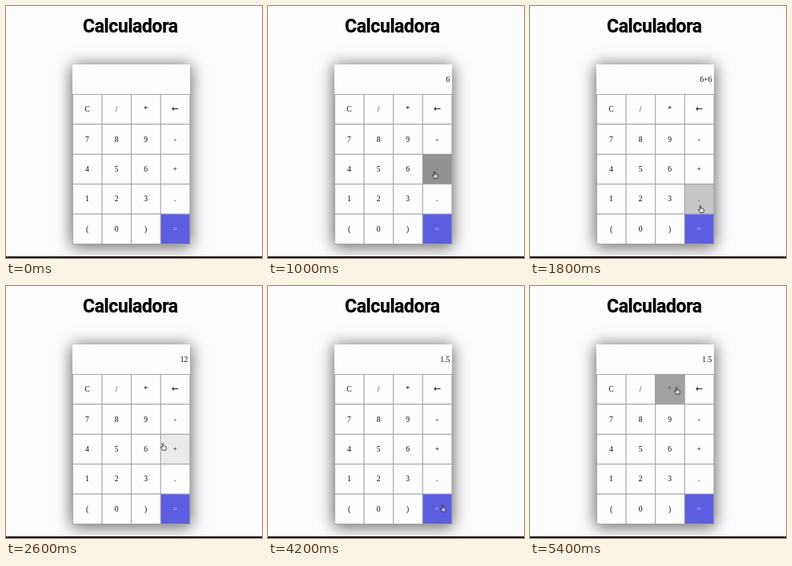
An HTML page that plays this animation: 320x315 px, repeating every 5.5 s.

```html
<!DOCTYPE html>
<html lang="es">
<head>
<meta charset="utf-8">
<title>Calculadora</title>
<style>
  html, body { margin: 0; width: 100%; height: 100%; overflow: hidden; background: #fdfcfe; }
  #stage { position: absolute; left: 0; top: 0; width: 320px; height: 315px; overflow: hidden; }
  #shade { position: absolute; left: 83px; top: 73px; width: 147px; height: 225px; background: #fdfcfe; box-shadow: 0 2px 19px 1px rgba(0, 0, 0, .62); }
  svg { position: absolute; left: 0; top: 0; display: block; }
  .title { font: 700 23px Roboto, sans-serif; letter-spacing: -.4px; fill: #000; stroke: #000; stroke-width: .25px; }
  .key, .out { font: 9.7px "Liberation Serif", serif; fill: #111; }
  .key { text-anchor: middle; }
  .out { text-anchor: end; }
  .arrow { font: 11px "DejaVu Sans", sans-serif; }
</style>
</head>
<body>
<div id="stage">
  <div id="shade"></div>
  <svg width="320" height="315" viewBox="0 0 320 315">
    <text class="title" x="96" y="32.7">Calculadora</text>
    <text class="out" id="out" x="227.4" y="95"></text>
    <g id="keys"></g>
    <rect y="313" width="320" height="2" fill="#0a0a0a"/>
    <g id="hand">
      <path d="M-1.7 .8V-3.6Q-1.7-4.4-1-4.4T-.3-3.6V-1.2L2.3-.7Q3.4-.4 3.4 .8V2.4L2.7 4.3H-1.2L-3.4 1.2Q-3.6 .1-2.7 .2Z"
        fill="#fff" fill-opacity=".5" stroke="#222" stroke-width=".8" stroke-linejoin="round"/>
    </g>
  </svg>
</div>
<script>
const LOOP = 5500, STEP = 100, FADE = 500, LAG = 20;
const LABELS = [..."C/*←789-456+123.(0)="];
const LEFT = 83.5, TOP = 110.5, W = 36.6, H = 37.4;

// Resting and turning points of the pointer: [ms, x, y]
const TRACK = [
  [100, 316, 311], [500, 177, 208], [700, 178, 208], [780, 206, 258], [900, 209, 212],
  [1150, 209, 210], [1500, 177, 206], [1650, 177, 206], [1800, 214, 254], [2000, 212, 282],
  [2500, 213, 270], [2600, 197, 201], [3050, 160, 166], [3200, 139, 138], [3330, 139, 140],
  [3400, 139, 154], [3500, 139, 168], [3750, 139, 168], [4100, 218, 281], [4200, 219, 278],
  [4500, 213, 252], [4900, 212, 249], [5150, 205, 150], [5400, 184, 131]
];

const SHOWN = [[0, ""], [600, "6"], [1100, "6+"], [1600, "6+6"], [2200, "12"], [3300, "12/"], [3700, "12/8"], [4100, "1.5"]];

const $ = id => document.getElementById(id);
const make = (tag, attrs) => {
  const el = document.createElementNS("http://www.w3.org/2000/svg", tag);
  for (const k in attrs) el.setAttribute(k, attrs[k]);
  return $("keys").appendChild(el);
};
const mix = (a, b, p) => a + (b - a) * p;
const gray = v => `rgb(${v},${v},${v})`;
const ease = p => 1 - (1 - p) ** 2;

const keys = LABELS.map((label, i) => {
  const x = LEFT + (i % 4) * W, y = TOP + Math.floor(i / 4) * H;
  const box = make("rect", { x, y, width: W, height: H, stroke: "#a0a0a0", "stroke-width": .9, fill: "#5d5de1" });
  const text = make("text", { x: x + W / 2 - .3, y: y + 21.7, class: label === "←" ? "key arrow" : "key" });
  text.textContent = label;
  if (label === "=") text.style.fill = "#c8c8f4";
  return { label, box, text };
});

function pointer(t) {
  const i = TRACK.findIndex(p => p[0] >= t);
  if (i < 1) return TRACK[0].slice(1);
  const [t0, x0, y0] = TRACK[i - 1], [t1, x1, y1] = TRACK[i];
  const p = (t - t0) / (t1 - t0);
  return [mix(x0, x1, p), mix(y0, y1, p)];
}

// Index of the key under the fingertip, -1 outside the pad
function keyAt(t) {
  const [x, y] = pointer(t - LAG);
  const col = Math.floor((x - 1 - LEFT) / W), row = Math.floor((y - 5 - TOP) / H);
  return col < 0 || col > 3 || row < 0 || row > 4 ? -1 : row * 4 + col;
}

// A key darkens while hovered and resets at once when left
function hoverLevel(t, key) {
  let held = 0;
  while (held < FADE && keyAt(t - held) === key) held += 5;
  return ease(held / FADE);
}

function draw(t) {
  const hovered = keyAt(t);
  keys.forEach(({ label, box, text }, i) => {
    if (label === "=") return;
    const p = i === hovered ? hoverLevel(t, i) : 0;
    box.style.fill = gray(mix(253, 8, p));
    text.style.fill = gray(mix(17, 255, p));
  });
  $("out").textContent = SHOWN.filter(s => s[0] <= t).pop()[1];
  $("hand").setAttribute("visibility", t < TRACK[0][0] ? "hidden" : "visible");
  $("hand").setAttribute("transform", `translate(${pointer(t)})`);
}

const start = performance.now();
function tick() {
  const t = (performance.now() - start) % LOOP;
  draw(Math.floor(t / STEP) * STEP);
  requestAnimationFrame(tick);
}
tick();
</script>
</body>
</html>
```
